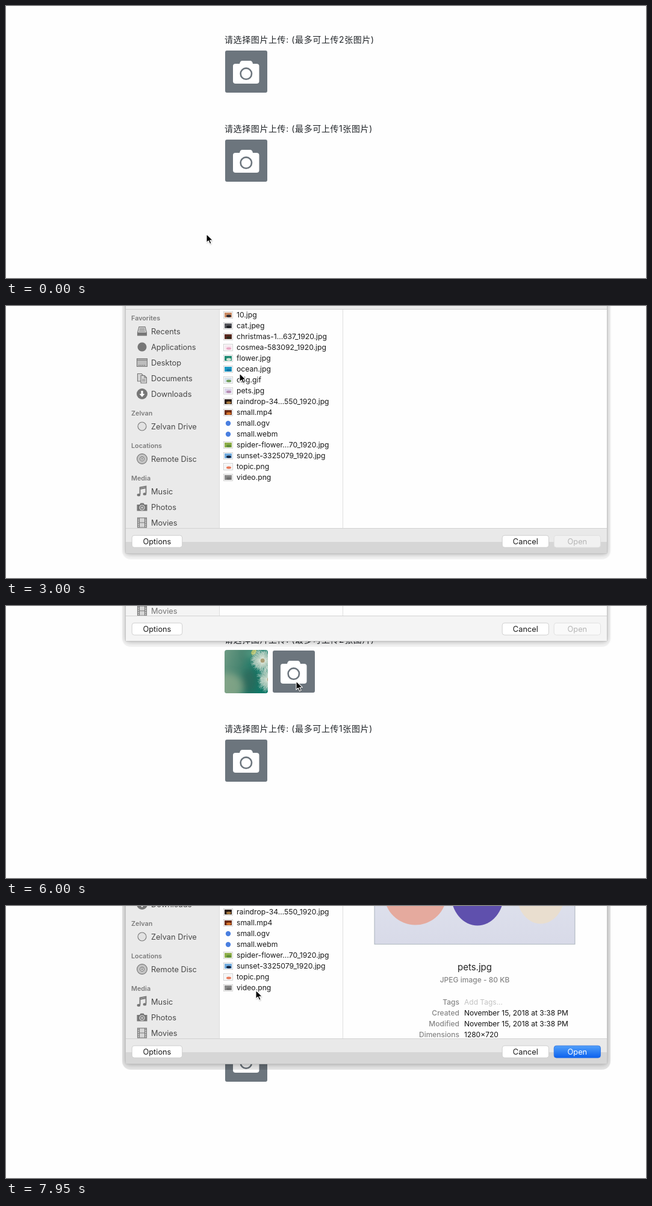
Recreate the animation shown at these times as an HTML page. Size 1063x452 px, loop 8000 ms.

```html
<!DOCTYPE html>
<html lang="zh-CN">
<head>
<meta charset="utf-8">
<title>图片上传</title>
<style>
html, body { margin: 0; width: 100%; height: 100%; overflow: hidden; background: #fefefe; }
svg { display: block; width: 100%; height: 100%; font-family: Inter, 'Noto Sans CJK SC', 'Noto Sans CJK', sans-serif; }
.label { font-size: 14px; letter-spacing: .6px; fill: #212529; }
.head { font-size: 10.8px; font-weight: 600; fill: #7b7b7b; }
.item { font-size: 12.8px; }
.file { font-size: 12.2px; }
.meta { font-size: 12px; fill: #111; }
.key { font-size: 12px; font-weight: 500; fill: #868686; }
.btn { font-size: 12.8px; text-anchor: middle; fill: #1c1c1c; }
</style>
</head>
<body>
<svg id="stage" viewBox="0 0 1063 452"></svg>
<script>
const stage = document.getElementById('stage');
const $ = id => document.getElementById(id);

// Markup helpers
const attrs = o => Object.entries(o).map(([k, v]) => ` ${k}="${v}"`).join('');
const rect = (x, y, width, height, fill, o = {}) => `<rect${attrs({ x, y, width, height, fill, ...o })}/>`;
const circle = (cx, cy, r, fill, o = {}) => `<circle${attrs({ cx, cy, r, fill, ...o })}/>`;
const ellipse = (cx, cy, rx, ry, fill, o = {}) => `<ellipse${attrs({ cx, cy, rx, ry, fill, ...o })}/>`;
const path = (d, fill, o = {}) => `<path${attrs({ d, fill, ...o })}/>`;
const text = (x, y, cls, str, o = {}) => `<text${attrs({ x, y, class: cls, ...o })}>${str}</text>`;
const group = (o, ...kids) => `<g${attrs(o)}>${kids.join('')}</g>`;
const at = (x, y, ...kids) => group({ transform: `translate(${x} ${y})` }, ...kids);
const grad = (id, dir, ...stops) => `<linearGradient id="${id}" ${dir}>` +
  stops.map(([o, c]) => `<stop offset="${o}" stop-color="${c}"/>`).join('') + '</linearGradient>';
const blur = (id, s) => `<filter id="${id}" x="-50%" y="-50%" width="200%" height="200%"><feGaussianBlur stdDeviation="${s}"/></filter>`;
const clip = (id, w, h, rx = 0) => `<clipPath id="${id}">${rect(0, 0, w, h, '#000', { rx })}</clipPath>`;

let seed = 7;
const rnd = () => (seed = (seed * 16807) % 2147483647) / 2147483647;

function burst(cx, cy, R) {
  let rays = '';
  for (let i = 0; i < 120; i++) {
    const a = i * 2.4, r = R * (.62 + .38 * rnd());
    const p = (q, b) => `${(cx + q * Math.cos(b)).toFixed(1)} ${(cy + q * Math.sin(b)).toFixed(1)}`;
    rays += `M${p(R * .16, a)}L${p(r * .75, a)}L${p(r, a - .09)}M${p(r * .75, a)}L${p(r, a + .09)}`;
  }
  return circle(cx, cy, R * .62, '#d9dccb', { opacity: .55, filter: 'url(#soft)' }) +
    path(rays, 'none', { stroke: '#f7f3ea', 'stroke-width': .9, opacity: .85 }) +
    circle(cx, cy, R * .17, '#b69a6c', { filter: 'url(#soft2)', opacity: .8 });
}

const flower = group({ 'clip-path': 'url(#flowerClip)' },
  rect(0, 0, 281, 187, 'url(#leafBg)'),
  group({ filter: 'url(#haze)' },
    ellipse(15, 160, 65, 60, '#8fab8c', { opacity: .75 }),
    ellipse(108, 135, 34, 55, '#2d6658', { opacity: .7 }),
    ellipse(120, 15, 30, 16, '#6fae92', { opacity: .6 })),
  path('M122 0Q108 12 120 22Q138 20 138 0Z', '#aebf6f', { filter: 'url(#soft2)' }),
  path('M225 148Q255 165 285 182', 'none', { stroke: '#7fae45', 'stroke-width': 6, filter: 'url(#soft2)' }),
  burst(164, 46, 54), burst(194, 128, 60));

const pets = group({ 'clip-path': 'url(#petsClip)' },
  rect(0, 0, 333, 187, 'url(#petsBg)'),
  ellipse(68, 103, 52, 52, '#e5aa9e'),
  ellipse(171, 103, 44, 53, '#5f50ad'),
  ellipse(276, 103, 40, 50, '#e9decf'));

// Page
const camera = (x, y) => at(x, y,
  rect(0, 0, 70, 70, '#6c757d', { rx: 3 }),
  path('M17 22H24Q25 17 28.5 17H41.5Q45 17 46 22H52Q56.5 22 56.5 26V51Q56.5 55 52 55H17.5Q13 55 13 51V26Q13 22 17 22Z', '#fff'),
  circle(34.8, 38.6, 9.2, 'none', { stroke: '#6c757d', 'stroke-width': 2.6 }));

const page =
  text(363, 61, 'label', '请选择图片上传: (最多可上传2张图片)') +
  text(363, 209, 'label', '请选择图片上传: (最多可上传1张图片)') +
  group({ id: 'thumb' }, at(363, 73, group({ 'clip-path': 'url(#thumbClip)' },
    group({ transform: 'scale(.385)' }, flower)))) +
  group({ id: 'picker' }, camera(364, 74)) + camera(364, 222);

// Sidebar
const line = { stroke: 'currentColor', 'stroke-width': 1.1 };
const ink = 'currentColor', pale = '#d6d6d6';
const icons = {
  tray: path('M-5 -7.5H5L7.5 2V7H-7.5V2Z', pale, line) + path('M-4 -5H4M-4.5 -2.5H4.5M-5 0H5', 'none', line) + rect(-7.5, 2, 15, 5, ink),
  dot: circle(0, 0, 7.5, ink),
  ring: circle(0, 0, 7, '#e2e2e2', line),
  desk: rect(-8.5, -6.5, 17, 13, '#bdbdbd', line) + path('M-8 -4H8', 'none', line) + path('M-6 4.5H6', 'none', { ...line, 'stroke-dasharray': '2 1' }),
  docs: path('M-7.5 -7.5H-1L2 -4.5V5H-7.5Z', pale, line) + path('M-2 -4.5H4L7.5 -1V8H-2Z', pale, line) + path('M4 -4.5V-1H7.5M0 2H5.5M0 4.5H5.5', 'none', line),
  down: circle(0, 0, 9, ink) + path('M-1.6 -5H1.6V0H4.5L0 5.2L-4.5 0H-1.6Z', '#fff'),
  disc: circle(0, 0, 8.4, '#c4c4c4', line) + circle(0, 0, 3.4, '#ddd', line) + circle(0, 0, 1.2, ink),
  note: path('M-3.5 5V-6.5L6.5 -8.5V3.5M-3.5 -4L6.5 -6', 'none', { ...line, 'stroke-width': 1.8 }) + ellipse(-5.6, 6, 2.8, 2.2, ink) + ellipse(4.4, 4.4, 2.8, 2.2, ink),
  photo: path('M-8.5 -4H-4L-2.5 -6.5H2.5L4 -4H8.5V6.5H-8.5Z', ink) + circle(0, 1, 4, 'none', { stroke: '#e0e0e0', 'stroke-width': 1.2 }) + circle(0, 1, 1.8, '#ccc'),
  film: rect(-7.5, -8, 15, 16, pale, line) + path('M-4.5 -8V8M4.5 -8V8M-4.5 0H4.5', 'none', line) + path('M-6 -7V8M6 -7V8', 'none', { ...line, 'stroke-dasharray': '2 1.5' })
};
const places = [
  [20, 'Favorites'], [42, 'Recents', 'tray'], [68, 'Applications', 'dot'], [94, 'Desktop', 'desk'],
  [120, 'Documents', 'docs'], [146, 'Downloads', 'down'], [178, 'Zelvan'], [200, 'Zelvan Drive', 'ring'],
  [232, 'Locations'], [254, 'Remote Disc', 'disc'], [286, 'Media'], [308, 'Music', 'note'],
  [334, 'Photos', 'photo'], [360, 'Movies', 'film']
];
const sidebar = places.map(([y, name, icon]) => icon
  ? at(226, y, group({ color: '#777' }, icons[icon])) + text(241, y + 4.7, 'item', name)
  : text(208, y + 4, 'head', name)).join('');

// File list: name and two icon tones
const files = [
  ['10.jpg', '#c98a63', '#2b2b33'], ['cat.jpeg', '#55565c', '#1d1e22'],
  ['christmas-1...637_1920.jpg', '#5b2a20', '#2d2a1b'], ['cosmea-583092_1920.jpg', '#f6e9f0', '#e9a9c4'],
  ['flower.jpg', '#1f8a72', '#d7e6d6'], ['ocean.jpg', '#1c9ac4', '#1577a8'],
  ['orig.gif', '#d4e0ea', '#6f9c58'], ['pets.jpg', '#dcd6ea', '#b58bb0'],
  ['raindrop-34...550_1920.jpg', '#2a1d17', '#a8793f'], ['small.mp4', '#6b2a12', '#d8752a'],
  ['small.ogv'], ['small.webm'],
  ['spider-flower...70_1920.jpg', '#8fae4a', '#5d8f3a'], ['sunset-3325079_1920.jpg', '#6fa9dc', '#14233d'],
  ['topic.png', '#f4f4f4', '#e8795a'], ['video.png', '#8a8a8a', '#6f6f6f']
];
const fileIcon = (a, b) => a
  ? rect(-7.5, -5.5, 15, 11, '#fff', { stroke: '#c8c8c8', 'stroke-width': .8 }) + rect(-6, -4, 12, 8, a) +
    ellipse(1, 1.6, 4, 2.2, b)
  : circle(0, 0, 4.2, '#4a7fe0');
const list = files.map(([name, a, b], i) => {
  const y = 15 + 18 * i;
  return at(369, y, fileIcon(a, b)) + text(383, y + 4, 'file', name, { id: 'file' + i });
}).join('');

// Preview column
function preview(id, image, x, w, name, size, date, dims) {
  const rows = [['Tags', 'Add Tags...'], ['Created', date], ['Modified', date], ['Dimensions', dims]];
  const mid = { 'text-anchor': 'middle' };
  return group({ id },
    at(x, 25.5, image, rect(0, 0, w, 187, 'none', { stroke: '#6d7f88', 'stroke-opacity': .5 })),
    text(778.5, 256, '', name, { ...mid, 'font-size': 15, fill: '#222' }),
    text(778.5, 276, 'key', 'JPEG image - ' + size, mid),
    rows.map(([k, v], i) => text(753, 313 + 18 * i, 'key', k, { 'text-anchor': 'end' }) +
      text(761, 313 + 18 * i, 'meta', v, i ? {} : { style: 'fill:#c2c2c2' })).join(''));
}

const button = (id, x, w, name) =>
  rect(x, 381.2, w, 20, '#fff', { rx: 4, stroke: '#c6c6c6', 'stroke-width': .8, id }) +
  text(x + w / 2, 395.7, 'btn', name, { id: id + 'Text' });

const panel = group({ id: 'panel' },
  rect(193, -100, 811, 521, '#000', { id: 'halo', rx: 14 }),
  rect(199, -100, 799, 512, '#000', { opacity: .32, filter: 'url(#shade)', rx: 4 }),
  rect(198.5, -100, 800, 511.5, '#ececec', { rx: 2, stroke: '#bdbdbd', 'stroke-width': .8 }),
  rect(199, 6, 799, 364, '#fefefe'),
  rect(199, 6, 155, 364, '#eaeaea', { id: 'side' }),
  path('M199 5.5H998', 'none', { stroke: '#cfcfcf' }),
  path('M354.5 6V370M559.5 6V370', 'none', { stroke: '#dedede' }),
  group({ id: 'places' }, sidebar),
  rect(355, 78, 204, 17, '#0063e1', { id: 'mark' }),
  group({ id: 'list' }, list),
  preview('preview4', flower, 638, 281, 'flower.jpg', '375 KB', 'December 24, 2018 at 10:52 AM', '800×534'),
  preview('preview7', pets, 612, 333, 'pets.jpg', '80 KB', 'November 15, 2018 at 3:38 PM', '1280×720'),
  rect(199, 370, 799, 41, '#e9e9e9', { id: 'bar' }),
  rect(199, 392, 799, 19, '#d6d6d6', { id: 'band' }),
  path('M199 369.5H998', 'none', { stroke: '#d2d2d2' }),
  button('options', 209.2, 83.5, 'Options'),
  button('cancel', 824.2, 77.3, 'Cancel'),
  button('open', 910.2, 77.3, 'Open'));

const arrow = 'M0 0V14.2L3.3 11.1L5.7 16.4L8.1 15.3L5.8 10.2H10.3Z';
const cursor = group({ id: 'cursor' },
  path(arrow, '#000', { transform: 'translate(.5 1.5)', opacity: .3, filter: 'url(#soft1)' }),
  path(arrow, '#000', { stroke: '#fff', 'stroke-width': 1.1, 'stroke-linejoin': 'round' }));

stage.innerHTML = '<defs>' +
  blur('soft', 6) + blur('soft1', 1) + blur('soft2', 2) + blur('haze', 14) + blur('shade', 4) +
  clip('flowerClip', 281, 187) + clip('petsClip', 333, 187) + clip('thumbClip', 72, 72, 4) +
  grad('leafBg', 'x2="1" y2=".2"', [0, '#6d9a83'], [.3, '#478470'], [.55, '#177a69'], [1, '#057565']) +
  grad('petsBg', 'x2="0" y2="1"', [0, '#e6eaf3'], [1, '#d8dae8']) +
  grad('blue', 'x2="0" y2="1"', [0, '#52a0fa'], [1, '#0b61ee']) +
  '</defs>' + page + panel + cursor;

// Timelines hold each value until the next entry
const moves = [
  [0, 333, 379], [300, 312, 350], [450, 270, 300], [600, 238, 236], [750, 244, 168], [900, 282, 114],
  [1050, 346, 77], [1200, 388, 93], [1350, 388, 103], [1500, 388, 112],
  [3150, 394, 107], [3300, 405, 96], [3450, 412, 89],
  [5100, 428, 97], [5250, 452, 109], [5400, 472, 119], [5550, 482, 125],
  [6900, 462, 134], [7050, 428, 144], [7200, 415, 140]
];
const HIDDEN = -600;
// time, panel y, active, listed, selected row, previewed
const sheet = [
  [0, HIDDEN],
  [2100, -353], [2250, -53], [2400, 0], [2550, 0, 0, 1], [2700, 0, 1, 1],
  [3600, 0, 1, 1, 4], [3750, 0, 1, 1, 4, 1], [4350, -149, 1, 1, 4, 1], [4500, -327, 1, 1, 4, 1], [4650, HIDDEN],
  [6000, -353], [6150, -53], [6300, 0, 0, 1], [6450, 0, 1, 1],
  [7500, 0, 1, 1, 7], [7650, 0, 1, 1, 7, 1], [7950, -149, 1, 1, 7, 1]
];
const hold = (rows, t) => rows.reduce((a, b) => b[0] <= t ? b : a);
const set = (id, o) => { for (const k in o) $(id).setAttribute(k, o[k]); };
const show = (id, on) => set(id, { visibility: on ? 'visible' : 'hidden' });
const move = (id, x, y) => set(id, { transform: `translate(${x} ${y})` });

function draw(t) {
  const [, cx, cy] = hold(moves, t);
  const [, y, active, listed, sel = -1, seen] = hold(sheet, t);
  move('cursor', cx, cy);
  show('thumb', t >= 4800);
  move('picker', t >= 4800 ? 79 : 0, 0);

  move('panel', 0, y);
  show('panel', y !== HIDDEN);
  if (y === HIDDEN) {
    ['mark', 'list', 'band', 'preview4', 'preview7'].forEach(id => show(id, false));
    return;
  }
  set('halo', { opacity: y === -149 ? .1 : .045 });
  set('side', { fill: active ? '#eaeaea' : '#f4f4f4' });
  set('bar', { fill: active ? '#e9e9e9' : '#f4f4f4' });
  set('places', { fill: active ? '#474747' : '#747474', transform: `translate(0 ${active || !y ? 0 : 1})` });
  show('band', active);
  show('list', listed);
  show('mark', sel >= 0);
  set('mark', { y: 78 + 18 * (sel - 4) });
  files.forEach((_, i) => set('file' + i, { fill: i === sel ? '#fff' : '#1a1a1a' }));
  show('preview4', seen && sel === 4);
  show('preview7', seen && sel === 7);
  const on = sel >= 0;
  set('open', { fill: on ? 'url(#blue)' : active ? '#f1f1f1' : '#f9f9f9', stroke: on ? '#2a6fe0' : '#dcdcdc' });
  set('openText', { style: `fill:${on ? '#fff' : '#b5b5b5'}` });
}

const start = performance.now();
(function tick() {
  draw((performance.now() - start) % 8000);
  requestAnimationFrame(tick);
})();
</script>
</body>
</html>
```
